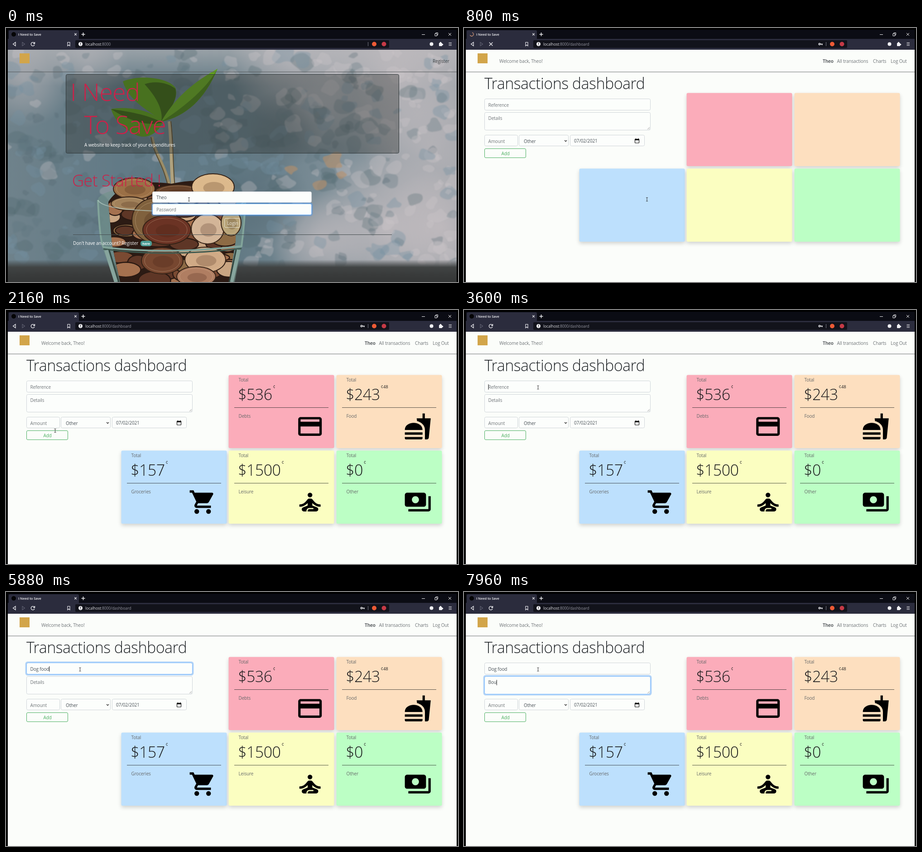
Animation of 998 by 561 pixels, one loop 8 s. Source, as an HTML page with a canvas:

```html
<!DOCTYPE html>
<html lang="en">
<head>
<meta charset="utf-8">
<title>I Need to Save</title>
<style>
  html, body { margin: 0; width: 100%; height: 100%; overflow: hidden; background: #000; }
  canvas { display: block; }
</style>
</head>
<body>
<canvas id="stage" width="998" height="561"></canvas>
<script>
const LOOP = 8000;
const USER = 'Theo';
const GREY = '#707579', INK = '#495057';
const stage = document.getElementById('stage');
let ctx = stage.getContext('2d');

const clamp = v => Math.max(0, Math.min(1, v));
const ease = v => { v = clamp(v); return v * v * (3 - 2 * v); };

function text(str, x, y, color, size = 10, weight = 400) {
  ctx.font = `${weight} ${size}px "Open Sans", "Noto Sans", sans-serif`;
  ctx.letterSpacing = `${-0.015 * size}px`;
  ctx.fillStyle = color;
  ctx.fillText(str, x, y);
  return x + ctx.measureText(str).width;
}

function rect(x, y, w, h, color) {
  ctx.fillStyle = color;
  ctx.fillRect(x, y, w, h);
}

function box(x, y, w, h, r, fill, stroke, width = 1) {
  ctx.beginPath();
  ctx.roundRect(x, y, w, h, r);
  if (fill) { ctx.fillStyle = fill; ctx.fill(); }
  if (stroke) { ctx.strokeStyle = stroke; ctx.lineWidth = width; ctx.stroke(); }
}

function oval(x, y, rx, ry, fill, stroke, width = 1) {
  ctx.beginPath();
  ctx.ellipse(x, y, rx, ry, 0, 0, 7);
  if (fill) { ctx.fillStyle = fill; ctx.fill(); }
  if (stroke) { ctx.strokeStyle = stroke; ctx.lineWidth = width; ctx.stroke(); }
}

const dot = (x, y, r, color) => oval(x, y, r, r, color);

function path(d, fill, stroke, width = 1) {
  const p = new Path2D(d);
  if (fill) { ctx.fillStyle = fill; ctx.fill(p); }
  if (stroke) { ctx.strokeStyle = stroke; ctx.lineWidth = width; ctx.stroke(p); }
}

function gradient(x0, y0, x1, y1, ...colors) {
  const g = ctx.createLinearGradient(x0, y0, x1, y1);
  colors.forEach((c, i) => g.addColorStop(i / (colors.length - 1), c));
  return g;
}

// Soft patch of colour; rgb is "r,g,b"
function glow(x, y, r, rgb, alpha) {
  const g = ctx.createRadialGradient(x, y, 0, x, y, r);
  g.addColorStop(0, `rgba(${rgb},${alpha})`);
  g.addColorStop(0.5, `rgba(${rgb},${alpha * 0.6})`);
  g.addColorStop(1, `rgba(${rgb},0)`);
  rect(x - r, y - r, 2 * r, 2 * r, g);
}

// Simplified stand-in for the photograph, painted once
function paintPhoto() {
  const canvas = document.createElement('canvas');
  canvas.width = 998;
  canvas.height = 561;
  const main = ctx;
  ctx = canvas.getContext('2d');

  let seed = 11;
  const random = () => (seed = seed * 16807 % 2147483647) / 2147483647;

  function blob(x, y, r, color) {
    const points = Array.from({ length: 9 }, (_, i) => {
      const a = i * Math.PI * 2 / 9, d = r * (0.5 + random() * 0.8);
      return [x + Math.cos(a) * d * 1.2, y + Math.sin(a) * d];
    });
    ctx.beginPath();
    for (let i = 0; i <= 9; i++) {
      const [px, py] = points[i % 9], [qx, qy] = points[(i + 1) % 9];
      const mid = [(px + qx) / 2, (py + qy) / 2];
      if (i) ctx.quadraticCurveTo(px, py, ...mid);
      else ctx.moveTo(...mid);
    }
    ctx.fillStyle = color;
    ctx.fill();
  }

  rect(0, 48, 998, 513, gradient(0, 0, 998, 0, '#6f828b', '#627a86', '#607883', '#81919a', '#9ba1a7'));
  rect(0, 48, 998, 80, gradient(0, 48, 0, 128, 'rgba(190,188,190,.6)', 'rgba(190,188,190,0)'));
  const pale = '200,192,195';
  [[640, 70, 150, .6], [860, 110, 190, .75], [690, 180, 90, .4], [940, 270, 150, .55], [840, 440, 170, .8],
   [690, 470, 110, .7], [960, 440, 130, .7], [40, 110, 110, .5], [180, 70, 90, .4]]
    .forEach(([x, y, r, a]) => glow(x, y, r, pale, a));
  glow(560, 380, 110, '75,95,106', .4);
  glow(610, 225, 90, '75,92,100', .4);

  const tones = ['rgba(82,102,111,.3)', 'rgba(115,144,160,.35)', 'rgba(92,116,127,.3)'];
  ctx.filter = 'blur(1px)';
  for (let i = 0; i < 480; i++) {
    const x = random() * 998, y = 50 + random() * 475, r = 5 + random() * 17;
    const light = random() < 0.08 + 0.55 * (x / 998) ** 2 + (y < 120 ? 0.35 : 0);
    blob(x, y, r, light ? 'rgba(205,199,202,.32)' : tones[i % 3]);
  }
  [[722, 292, 20], [690, 348, 15], [628, 313, 12], [740, 325, 10]].forEach(([x, y, r]) => blob(x, y, r, 'rgba(184,143,105,.6)'));
  ctx.filter = 'none';
  rect(0, 512, 998, 49, gradient(0, 512, 0, 561, 'rgba(58,61,61,0)', '#414444', '#393b3b', '#343636'));

  path('M322 240C330 285 350 295 364 362', null, '#9b8d68', 7);
  path('M361 206C367 255 364 310 370 362', null, '#b0a27e', 8);
  path('M320 241C328 287 347 295 360 360M364 206C370 255 368 310 374 360', null, '#574a30', 2);
  path('M258 118C300 101 361 112 374 132C383 158 354 190 343 206C326 187 272 166 258 118Z', '#579618');
  path('M306 124C330 115 360 122 374 134C382 160 354 190 343 206C348 180 330 150 306 124Z', '#38600f');
  path('M232 179C262 173 322 178 346 209C330 241 300 249 275 229C250 215 238 198 232 179Z', '#579618');
  path('M232 179C270 185 310 190 346 209C315 216 280 210 232 179Z', '#38600f');
  path('M467 90C442 105 382 137 343 207C398 195 439 157 467 90Z', '#62a31d');
  path('M467 90C445 130 400 170 343 207C398 195 439 157 467 90Z', '#477c15');

  path('M203 378Q212 350 365 348Q520 350 529 384L520 483L505 561H240L213 485Z', 'rgba(114,147,139,.6)');
  ctx.save();
  ctx.clip(new Path2D('M226 384Q260 330 365 344Q475 320 508 380L507 470L492 561H252L234 478Z'));
  rect(200, 320, 330, 241, '#2c1b14');
  const metals = ['#7a4a32', '#a5714f', '#c9a582', '#5e3626', '#8d6b45'];
  for (let i = 0; i < 60; i++) {
    const x = 230 + random() * 280, y = 370 + random() * 190;
    oval(x, y, 18 + random() * 22, 8 + random() * 14, metals[i % 5], '#2a1912', 2.5);
  }
  ctx.restore();
  const coins = [
    [283, 355, 46, 24, '#9b7046'], [380, 361, 50, 15, '#66422a'], [457, 351, 47, 29, '#dcb98c'],
    [272, 388, 40, 15, '#a2825b'], [328, 425, 50, 49, '#80613d'], [355, 446, 53, 32, '#6b3324'],
    [445, 444, 36, 33, '#d3b598'], [497, 430, 22, 29, '#b8a478'], [345, 514, 46, 29, '#774730'],
    [440, 512, 45, 28, '#d0aa86'], [420, 549, 43, 22, '#b07e62']
  ];
  for (const [x, y, rx, ry, color] of coins) {
    oval(x, y, rx, ry, color, '#352216', 2);
    oval(x, y, rx * 0.85, ry * 0.82, null, 'rgba(235,205,165,.35)');
    oval(x + 2, y + 2, rx * 0.5, ry * 0.45, 'rgba(60,30,15,.22)');
  }
  path('M203 380Q207 470 215 484Q350 501 520 482Q527 430 528 384', null, '#82a49a', 4);
  path('M215 488Q350 507 520 487', null, '#3f5a50', 3);
  path('M203 380Q212 400 325 404Q490 407 528 384', null, 'rgba(184,208,199,.65)', 2);
  path('M221 491L243 561M514 490L498 561', null, '#87a59d', 8);
  path('M228 491L249 561M508 490L493 561', null, '#33463f', 3);

  ctx = main;
  return canvas;
}

function spinnerOrIcon(t) {
  if (t < 560 || t > 1200) return dot(17, 14, 5, '#050506');
  ctx.beginPath();
  ctx.arc(17, 14, 4, t / 160, t / 160 + 4);
  ctx.strokeStyle = '#d79a79';
  ctx.lineWidth = 1.3;
  ctx.stroke();
}

function cross(x, y, r, color, width = 1) {
  path(`M${x - r} ${y - r}l${2 * r} ${2 * r}M${x + r} ${y - r}l${-2 * r} ${2 * r}`, null, color, width);
}

function browser(t) {
  const white = '#f1f1f4', sent = t >= 560;
  rect(4, 4, 991, 20, '#0b0c14');
  box(6, 5, 155, 22, [3, 3, 0, 0], '#2b2c3d');
  rect(4, 24, 991, 24, '#2b2c3d');
  spinnerOrIcon(t);
  text('I Need to Save', 27, 17, white, 7.6, 600);
  cross(153.5, 14, 2.3, white, 1.2);
  path('M166.5 14h8M170.5 10v8', null, white, 1.5);
  path('M918 14.5h7', null, white);
  path('M947 12.5h4.5v5H947zM949 12v-1.5h4.5v5H952', null, white);
  cross(980, 14, 3, white);

  path('M21 31.5v8l-5.5-4z', null, white, 1.2);
  path('M36 31.5v8l5.5-4z', null, '#626373', 1.1);
  if (sent && t < 1200) cross(59.5, 35.5, 3.8, white, 1.3);
  else path('M62.6 33.3A4 4 0 1 0 63 37M63.5 31v3.5H60', null, white, 1.3);
  path('M136 31.5h5v8l-2.5-2-2.5 2z', null, white, 1.1);
  box(153, 27, 693, 17, 2, '#12131b');
  dot(164.5, 35.5, 4.5, white);
  rect(164, 32.5, 1.2, 3.6, '#12131b');
  rect(164, 37, 1.2, 1.2, '#12131b');
  const host = text('localhost', 175, 38.5, '#dddde2', 8.6);
  text(sent ? ':8000/dashboard' : ':8000', host, 38.5, '#9495a0', 8.6);
  if (sent) {
    oval(785, 35.5, 1.8, 1.8, null, white, 1.4);
    path('M787 35.5h5M790.5 35.5v2.5', null, white, 1.4);
  }
  rect(799, 31, 1, 9, '#777884');
  dot(813, 35.5, 5, '#ec5a35');
  dot(834.5, 35.5, 5, '#c53a46');
  dot(939.5, 35.5, 4, white);
  box(956, 33, 7, 7, 1, white);
  dot(959.5, 32.5, 1.8, white);
  dot(963.5, 36.5, 1.8, white);
  path('M977.5 32.5h6.5M977.5 35.5h6.5M977.5 38.5h6.5', null, white, 1.2);
}

function field(x, y, w, h, focus = 0, fill = '#fcfefc') {
  if (focus) box(x - 0.5, y - 0.5, w + 1, h + 1, 3.5, null, `rgba(70,150,245,${0.4 * focus})`, 4);
  box(x + 0.5, y + 0.5, w - 1, h - 1, 3, fill, '#d0d5d9');
  if (focus) {
    ctx.globalAlpha = focus;
    box(x + 0.5, y + 0.5, w - 1, h - 1, 3, null, '#80bdff');
    ctx.globalAlpha = 1;
  }
}

function caret(x, y, since) {
  if (since >= 0 && since % 1000 < 500) rect(x, y - 9, 1, 12, '#222');
}

// Typed part of a string and the moment of its latest key
function typing(str, t, start, step) {
  const count = Math.max(0, Math.min(str.length, Math.floor((t - start) / step) + 1));
  return { shown: str.slice(0, count), last: start + (count - 1) * step };
}

function logo() { rect(30, 56, 22, 22, '#d2a54a'); }

const photo = paintPhoto();

function login(t) {
  const red = '#cc2149';
  ctx.drawImage(photo, 0, 0);
  logo();
  text('Register', 942, 77, '#3d4042');
  rect(4, 96.5, 991, 1, '#55595b');
  box(132.5, 102.5, 735, 174, 3, 'rgba(45,48,46,.36)', '#30383a');
  text('I Need', 142, 161, red, 54, 300);
  text('To Save', 172.5, 234, red, 55, 300);
  text('A website to keep track of your expenditures', 173, 262, '#fff');
  text('Get Started !', 146, 350, red, 36, 300);

  field(323, 361, 352, 25);
  text(USER, 332, 378, INK);
  field(323, 388, 352, 25, 1);
  const { shown, last } = typing('•••', t, 160, 160);
  if (shown) {
    for (let i = 0; i < shown.length; i++) dot(334 + i * 4, 401.5, 1.5, '#333');
    caret(331.5 + shown.length * 4, 405, t - last);
  } else text('Password', 332, 405, GREY);
  box(482.5, 420.5, 34, 20, 2.5, null, 'rgba(245,245,235,.75)');
  text('Login', 488, 435, '#eeeade');
  rect(148, 456, 704, 1, '#454d4f');
  text("Don't have an account? Register", 148, 479, '#fff');
  box(297, 470, 25, 12, 5, '#4c9d95');
  text('here', 301, 479, '#fff', 7.6, 700);
}

const cards = [
  [491, 143, '#fbacba', '$536', '¢', 'Debts', 'M20 4H4c-1.11 0-1.99.89-1.99 2L2 18c0 1.11.89 2 2 2h16c1.11 0 2-.89 2-2V6c0-1.11-.89-2-2-2zm0 14H4v-6h16v6zm0-10H4V6h16v2z'],
  [729, 143, '#fddfbf', '$243', '¢48', 'Food', 'M18.06 22.99h1.66c.84 0 1.53-.64 1.63-1.46L23 5.05h-5V1h-1.97v4.05h-4.97l.3 2.34c1.71.47 3.31 1.32 4.27 2.26 1.44 1.42 2.43 2.89 2.43 5.29v8.05zM1 21.99V21h15.03v.99c0 .55-.45 1-1.01 1H2.01c-.56 0-1.01-.45-1.01-1zm15.03-7c0-8-15.03-8-15.03 0h15.03zM1.02 17h15v2h-15z'],
  [254, 310, '#bde0fd', '$157', '¢', 'Groceries', 'M7 18a2 2 0 1 0 0 4a2 2 0 1 0 0-4zM1 2v2h2l3.6 7.59-1.35 2.45c-.16.28-.25.61-.25.96 0 1.1.9 2 2 2h12v-2H7.42c-.14 0-.25-.11-.25-.25l.03-.12.9-1.63h7.45c.75 0 1.41-.41 1.75-1.03l3.58-6.49c.08-.14.12-.31.12-.48 0-.55-.45-1-1-1H5.21l-.94-2H1zM17 18a2 2 0 1 0 0 4a2 2 0 1 0 0-4z'],
  [491, 310, '#fbfec1', '$1500', '¢', 'Leisure', 'M12 4a2 2 0 1 0 0 4a2 2 0 1 0 0-4zM21 16v-2c-2.24 0-4.16-.96-5.6-2.68l-1.34-1.6C13.68 9.26 13.12 9 12.53 9h-1.05c-.6 0-1.15.26-1.53.72l-1.34 1.6C7.16 13.04 5.24 14 3 14v2c2.77 0 5.19-1.17 7-3.25V15l-3.88 1.55C5.45 16.82 5 17.48 5 18.21 5 19.2 5.8 20 6.79 20H9v-.5c0-1.38 1.12-2.5 2.5-2.5h3c.28 0 .5.22.5.5s-.22.5-.5.5h-3c-.83 0-1.5.67-1.5 1.5v.5h7.1c.85 0 1.65-.5 1.88-1.32.26-.95-.24-1.87-1.08-2.2L14 15v-2.25c1.81 2.08 4.23 3.25 7 3.25z'],
  [729, 310, '#bcffc5', '$0', '¢', 'Other', 'M19 14V6c0-1.1-.9-2-2-2H3c-1.1 0-2 .9-2 2v8c0 1.1.9 2 2 2h14c1.1 0 2-.9 2-2zm-9-1c-1.66 0-3-1.34-3-3s1.34-3 3-3 3 1.34 3 3-1.34 3-3 3zm13-6v11c0 1.1-.9 2-2 2H4v-2h17V7h2z']
];

function card([x, y, color, amount, cents, label, icon], filled) {
  ctx.save();
  ctx.shadowColor = 'rgba(0,0,0,.17)';
  ctx.shadowBlur = 8;
  ctx.shadowOffsetY = 4;
  box(x + 0.5, y + 0.5, 233, 161.5, 3, color);
  ctx.restore();
  if (!filled) return;
  text('Total', x + 22.5, y + 15, '#66696a');
  const end = text(amount, x + 21, y + 56, '#1b1c1d', 34, 300);
  text(cents, end + 2, y + 30, '#222', 9.5);
  rect(x + 13, y + 72, 208, 1, 'rgba(35,35,35,.75)');
  text(label, x + 22.5, y + 95, '#66696a');
  ctx.save();
  ctx.translate(x + 149, y + 83);
  ctx.scale(2.6, 2.6);
  path(icon, '#000');
  ctx.restore();
}

function form(t) {
  const second = 6500;
  const toDetails = clamp((t - second) / 150);
  const reference = typing('Dog food', t, 4400, 180);
  const details = typing('Bou', t, 7320, 280);

  field(45, 156, 367, 26, clamp((t - 3600) / 150) * (1 - toDetails));
  let end = 53.5;
  if (reference.shown) end = text(reference.shown, 53.5, 173.5, INK);
  else text('Reference', 53.5, 173.5, GREY);
  if (t < second) caret(end, 173, t - (reference.shown ? reference.last : 3560));

  field(45, 186, 367, 40, toDetails);
  end = 53.5;
  if (details.shown) end = text(details.shown, 53.5, 203, INK);
  else text('Details', 53.5, 203, GREY);
  if (t >= second) caret(end, 203, t - (details.shown ? details.last : second));
  path('M405 224l5-5M408 224l2-2', null, '#888', 0.8);

  field(45, 236, 74, 25);
  text('Amount', 53.5, 253.5, GREY);
  field(121, 236, 110, 25);
  text('Other', 132, 253.5, INK);
  path('M222 248l2.5 2.5 2.5-2.5', null, '#333', 1.4);
  field(234, 236, 165, 25);
  text('07/02/2021', 243, 253, INK);
  box(377.5, 245.5, 9, 8.5, 1, null, '#111', 1.2);
  rect(377, 245, 10, 3, '#111');
  rect(379, 243.5, 1.2, 2, '#111');
  rect(384, 243.5, 1.2, 2, '#111');
  box(45.5, 266.5, 91, 20, 2.5, null, '#4caf62');
  text('Add', 82.5, 280.5, '#4caf62');
}

function dashboard(t) {
  rect(4, 48, 991, 513, '#fbfdfa');
  logo();
  text(`Welcome back, ${USER}!`, 78, 77, GREY);
  text(USER, 792, 77, '#5f6366', 10, 700);
  text('All transactions', 823.5, 77, GREY);
  text('Charts', 903, 77, GREY);
  text('Log Out', 942, 77, GREY);
  rect(4, 96.5, 991, 1.2, '#85888a');
  text('Transactions dashboard', 45, 134.5, '#212529', 34, 300);
  form(t);
  cards.forEach(c => card(c, t >= 1000));
}

function pointer(t) {
  const a = ease((t - 1300) / 860), b = ease((t - 2300) / 1000);
  const x = 404 - 295.5 * a + 55 * b, y = 378.5 - 112 * a - 95.5 * b;
  path(`M${x - 2} ${y - 4}h1.5l.5.5.5-.5h1.5M${x} ${y - 3.5}v7M${x - 2} ${y + 4}h1.5l.5-.5.5.5h1.5`, null, '#222', 0.9);
}

function draw(now) {
  const t = now % LOOP;
  rect(0, 0, 998, 561, '#000');
  ctx.save();
  ctx.beginPath();
  ctx.rect(4, 4, 991, 557);
  ctx.clip();
  (t < 800 ? login : dashboard)(t);
  browser(t);
  pointer(t);
  ctx.restore();
}

const start = performance.now();
function tick() {
  draw(performance.now() - start);
  requestAnimationFrame(tick);
}
tick();
</script>
</body>
</html>
```
